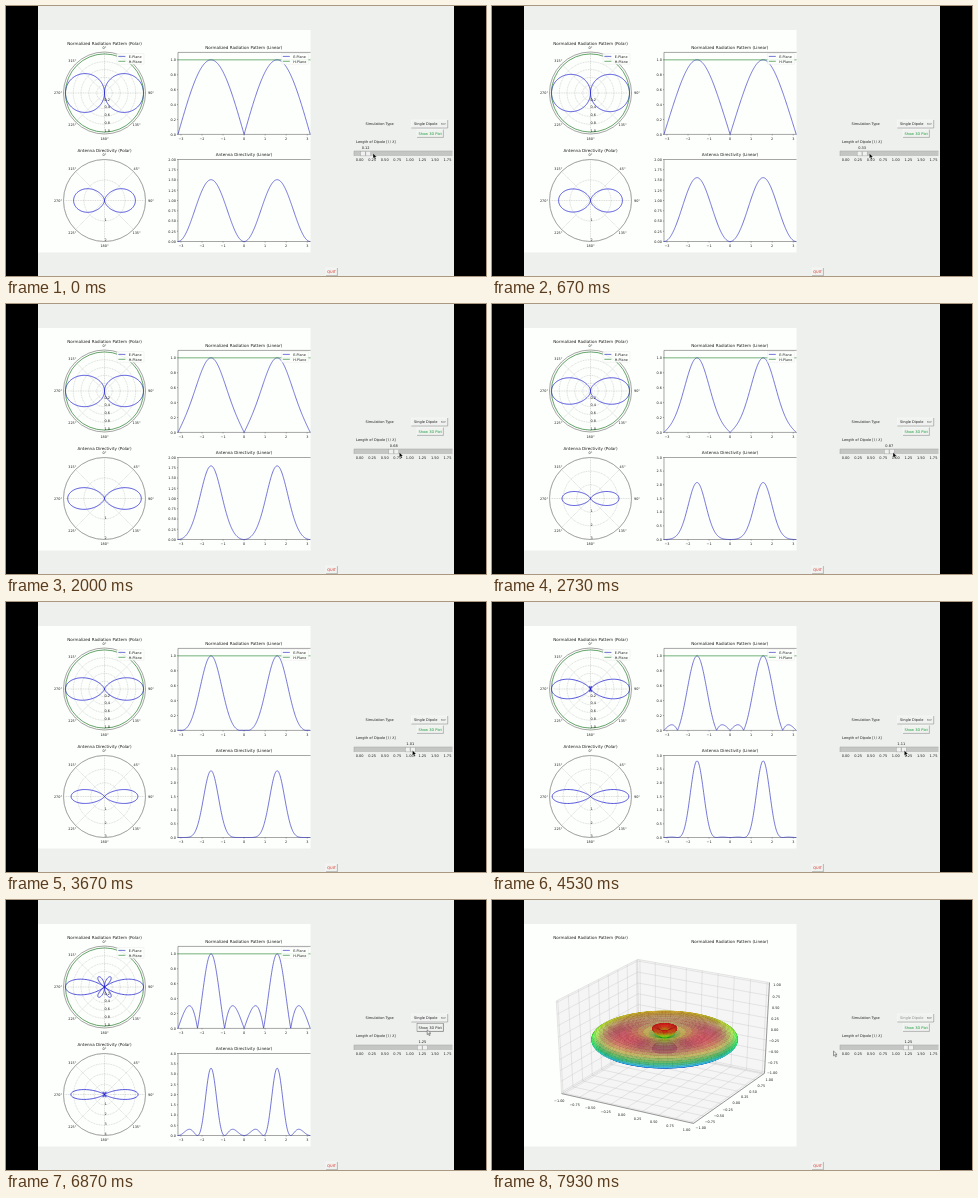
Animation of 480 by 270 pixels, one loop 8000 ms. Source, as an HTML page with a canvas:

```html
<!DOCTYPE html>
<html lang="en">
<head>
<meta charset="utf-8">
<title>Dipole radiation pattern</title>
<style>
  html, body { margin: 0; width: 100%; height: 100%; overflow: hidden; background: #000; }
  svg, canvas { position: absolute; left: 0; top: 0; width: 100vw; height: 100vh; display: block; }
  text { font-family: "DejaVu Sans", sans-serif; font-size: 3.4px; fill: #1c1c1c; text-rendering: geometricPrecision; }
  .title { font-size: 4.1px; }
  .ui { font-size: 3.55px; }
  .mid { text-anchor: middle; }
  .end { text-anchor: end; }
  .frame { fill: none; stroke: #4c4c4c; stroke-width: .5; }
  .grid { fill: none; stroke: #aaa; stroke-width: .4; stroke-dasharray: 1 .7; }
  .e { fill: none; stroke: #1c1cd0; stroke-width: .75; stroke-linejoin: round; }
  .h { fill: none; stroke: #147a1e; stroke-width: .6; }
  .thin { stroke: #2c2cc4; stroke-width: .65; }
  .pane { fill: #f4f5f4; stroke: #c4c4c4; stroke-width: .4; }
  .grid3 { fill: none; stroke: #c0c0c0; stroke-width: .35; }
  .btn { fill: #f0f2f0; stroke: #fafbfa; stroke-width: .5; }
  .edge { fill: none; stroke: #8a8a8a; stroke-width: .6; }
</style>
</head>
<body>
<svg id="stage" viewBox="0 0 480 270" preserveAspectRatio="none">
  <rect x="32" width="416" height="270" fill="#edf0ed"/>
  <rect x="32" y="24" width="272.5" height="222.5" fill="#fdfffc"/>
  <g id="plots"></g>
  <g id="space"></g>
  <g id="titles"></g>
  <g id="panel">
    <text class="ui" x="359.5" y="119.4">Simulation Type</text>
    <rect class="btn" x="405.3" y="114" width="36.4" height="8"/>
    <path class="edge" d="M405.3 122H441.7V114"/>
    <text class="ui" id="menu" x="408" y="119.4">Single Dipole</text>
    <rect x="435.6" y="117.2" width="4" height="1.4" fill="#f6f6f6" stroke="#777" stroke-width=".4"/>
    <rect class="btn" id="show" x="411" y="123.6" width="26.4" height="7.8"/>
    <path class="edge" d="M411 131.4H437.4V123.6"/>
    <text class="ui mid" id="showText" x="424.2" y="128.8">Show 3D Plot</text>
    <text class="ui" x="350" y="137.4">Length of Dipole [l / λ]</text>
    <text class="ui mid" id="value" y="142.8"></text>
    <rect x="348" y="145" width="98.5" height="5" fill="#c4c6c4"/>
    <path d="M348 150V145H446.5" fill="none" stroke="#a2a2a2" stroke-width=".5"/>
    <g id="thumb">
      <rect x="-5" y="145.2" width="10" height="4.7" fill="#eff1ef" stroke="#999" stroke-width=".4"/>
      <path d="M0 145.6V149.6" stroke="#777" stroke-width=".6"/>
    </g>
    <g id="scale"></g>
    <rect class="btn" x="320" y="262" width="11.4" height="7.7"/>
    <path class="edge" d="M320 269.7H331.4V262"/>
    <text class="ui mid" x="325.6" y="267.4" style="fill:#d8281c">QUIT</text>
  </g>
  <path id="cursor" d="M0 0V4.8L1.1 3.8L2 5.8L2.9 5.4L2 3.5H3.6Z"/>
</svg>
<canvas id="surface" width="1920" height="1080"></canvas>
<script>
const $ = id => document.getElementById(id);
const { PI, sin, cos, abs, min, max, ceil, floor } = Math;

const LOOP = 8000, STEP = 1000 / 15, OPEN_3D = 7270;
const CX = 98.5, R = 41, X0 = 238.1, XS = 21.05;
const LEFT = X0 - PI * XS, RIGHT = 304.5;
const top1 = { cy: 87, y0: 128.4, h: 82 };
const top2 = { cy: 194.5, y0: 235.5, h: 82 };

// time, dipole length
const lengthKeys = [[0, .12], [870, .39], [1270, .5], [1730, .61], [2600, .84], [2730, .87],
  [3670, 1.01], [5270, 1.19], [5670, 1.24], [6070, 1.24], [6140, 1.25]];
// time, pointer x, pointer y
const pointerKeys = [[0, 367, 147.4], [870, 380.5, 147.4], [1270, 387, 147.8], [1730, 390.5, 148.4],
  [2730, 401, 148.6], [3670, 406.5, 148.6], [5270, 417.3, 148.6], [5670, 418.4, 148.6],
  [6070, 418.4, 148.6], [6670, 421.2, 129.8], [7800, 421.2, 129.8], [7930, 341.5, 151]];

function track(keys, t, col = 1) {
  const i = keys.findIndex(k => k[0] > t);
  if (i < 0) return keys[keys.length - 1][col];
  const a = keys[i - 1], b = keys[i];
  return a[col] + (b[col] - a[col]) * (t - a[0]) / (b[0] - a[0]);
}

const text = (x, y, s, cls = "mid") => `<text class="${cls}" x="${x}" y="${y}">${s}</text>`;
const path = (d, cls) => `<path class="${cls}" d="${d}"/>`;
const ring = (cy, r, cls) => `<circle class="${cls}" cx="${CX}" cy="${cy}" r="${r}"/>`;
const num = (v, digits) => (v < 0 ? "−" : "") + abs(v).toFixed(digits);
const line = pts => "M" + pts.map(p => p[0].toFixed(2) + " " + p[1].toFixed(2)).join("L");

// Field of a centre-fed dipole of length l wavelengths
function field(l, th) {
  const s = sin(th);
  return abs(s) < 1e-4 ? 0 : abs((cos(PI * l * cos(th)) - cos(PI * l)) / s);
}
function peaks(l) {
  const n = 300;
  let top = 0, sum = 0;
  for (let i = 1; i < n; i++) {
    const th = PI * i / n, f = field(l, th);
    top = max(top, f);
    sum += f * f * sin(th) * PI / n;
  }
  return { top, gain: 2 / sum };
}

const angles = Array.from({ length: 361 }, (_, i) => (i - 180) * PI / 180);
const polar = (f, lim, cy) => line(angles.map(a => [CX + R * f(a) / lim * sin(a), cy - R * f(a) / lim * cos(a)]));
const linear = (f, lim, p) => line(angles.map(a => [X0 + XS * a, p.y0 - p.h * f(a) / lim]));

function axes(p) {
  let s = "";
  for (let k = 0; k < 8; k++) {
    const a = k * PI / 4, dx = sin(a), dy = -cos(a);
    s += path(`M${CX} ${p.cy}L${CX + R * dx} ${p.cy + R * dy}`, "grid");
    const far = k % 4 == 2 ? 46.5 : 45.4;
    s += text(CX + far * dx, p.cy + far * dy + 1.2, k * 45 + "°");
  }
  s += path(`M${RIGHT} ${p.y0}H${LEFT}V${p.y0 - p.h}H${RIGHT}`, "frame");
  for (let v = -3; v <= 3; v++) {
    const x = X0 + XS * v;
    s += path(`M${x} ${p.y0}v1`, "frame") + text(x, p.y0 + 5.1, num(v, 0));
  }
  return s + ring(p.cy, R, "frame");
}
function ticks(p, step, last, lim, digits) {
  let s = "";
  for (let v = 0; v <= last + 1e-6; v += step) {
    const y = p.y0 - p.h * v / lim;
    s += path(`M${LEFT} ${y}h-1`, "frame") + text(169.8, y + 1.25, num(v, digits), "end");
  }
  return s;
}
function rings(cy, step, last, lim) {
  let s = "";
  for (let v = step; v <= last + 1e-6; v += step) s += ring(cy, R * v / lim, "grid");
  return s;
}
function ringLabels(cy, step, last, lim, digits) {
  let s = "";
  for (let v = step; v <= last + 1e-6; v += step)
    s += text(98.4, cy + R * v / lim - .2, num(v, digits), "");
  return s;
}
const legend = x => `<rect x="${x}" y="47.6" width="27" height="10.6" rx=".6" fill="#fdfffc" fill-opacity=".88" stroke="#ddd" stroke-width=".3"/>`
  + path(`M${x + 1.4} 50.4h7`, "e thin") + text(x + 11.8, 51.7, "E-Plane", "")
  + path(`M${x + 1.4} 55.3h7`, "h") + text(x + 11.8, 56.6, "H-Plane", "");

$("titles").innerHTML = text(98.5, 38.6, "Normalized Radiation Pattern (Polar)", "title mid")
  + text(237.8, 42.7, "Normalized Radiation Pattern (Linear)", "title mid");

$("plots").innerHTML = axes(top1) + axes(top2)
  + rings(top1.cy, .2, 1, 1.05) + ticks(top1, .2, 1, 1.1, 1)
  + `<g id="gainAxes"></g>`
  + `<path id="e1" class="e"/><path id="e2" class="e thin"/><path id="d1" class="e"/><path id="d2" class="e thin"/>`
  + ring(top1.cy, R / 1.05, "h") + path(`M${LEFT} ${top1.y0 - top1.h / 1.1}H${RIGHT}`, "h")
  + ringLabels(top1.cy, .2, 1, 1.05, 1) + `<g id="gainLabels"></g>`
  + legend(111) + legend(275.4)
  + text(98.5, 145.6, "Antenna Directivity (Polar)", "title mid")
  + text(238, 149.7, "Antenna Directivity (Linear)", "title mid");

const knob = l => 353.6 + 50.2 * l;
for (let v = 0; v < 2; v += .25) $("scale").innerHTML += text(knob(v), 154.9, v.toFixed(2), "ui mid");

// Perspective view: azimuth -60°, elevation 30°, box from -1 to 1
const DATA = .965;
function project(x, y, z) {
  const depth = 10 - (.2165 * x - .375 * y + .25 * z);
  return [172.6 + 1522 * (.433 * x + .25 * y) / depth,
    138.6 - 1058 * (-.125 * x + .2165 * y + .433 * z) / depth, depth];
}
const poly = (...pts) => line(pts.map(p => project(...p)));

function drawBox() {
  let grid = "", labels = "";
  for (let v = -1; v <= 1; v += .25) {
    const d = v * DATA;
    grid += poly([d, -1, -1], [d, 1, -1], [d, 1, 1]) + poly([1, d, -1], [-1, d, -1], [-1, d, 1])
      + poly([-1, -1, d], [-1, 1, d], [1, 1, d]);
    for (const [p, dx, dy] of [[[d, -1, -1], -4.5, 8], [[1, d, -1], 6, 7], [[1, 1, d], 7.6, 2.2]]) {
      const [x, y] = project(...p);
      labels += text(x + dx, y + dy, num(v, 2));
    }
  }
  $("space").innerHTML = path(poly([-1, -1, -1], [1, -1, -1], [1, 1, -1], [-1, 1, -1]) + "Z", "pane")
    + path(poly([-1, -1, -1], [-1, 1, -1], [-1, 1, 1], [-1, -1, 1]) + "Z", "pane")
    + path(poly([-1, 1, -1], [1, 1, -1], [1, 1, 1], [-1, 1, 1]) + "Z", "pane")
    + path(grid, "grid3")
    + path(poly([-1, -1, -1], [1, -1, -1], [1, 1, -1], [1, 1, 1]), "frame") + labels;
}

function drawSurface() {
  const g = $("surface").getContext("2d"), rows = 80, cols = 100, l = 1.25;
  const { top } = peaks(l), quads = [];
  const point = (i, j) => {
    const th = PI * i / rows, ph = 2 * PI * j / cols, r = DATA * field(l, th) / top;
    return [r * sin(th) * cos(ph), r * sin(th) * sin(ph), r * cos(th)];
  };
  for (let i = 0; i < rows; i++) for (let j = 0; j < cols; j++) {
    const c = [point(i, j), point(i + 1, j), point(i + 1, j + 1), point(i, j + 1)];
    const z = (c[0][2] + c[1][2]) / 2, p = c.map(q => project(...q));
    quads.push({ p, z, depth: p.reduce((s, q) => s + q[2], 0) });
  }
  quads.sort((a, b) => b.depth - a.depth);
  g.scale(4, 4);
  g.lineWidth = .2;
  for (const { p, z } of quads) {
    const hue = 285 * (.5 - max(-.5, min(.5, z / .44)));
    g.beginPath();
    p.forEach(q => g.lineTo(q[0], q[1]));
    g.closePath();
    g.fillStyle = `hsla(${hue},88%,50%,.58)`;
    g.fill();
    g.strokeStyle = `hsla(${hue},70%,32%,.3)`;
    g.stroke();
  }
}

let shownLim = 0, shownLength = 0;
function drawPlots(l) {
  if (l === shownLength) return;
  shownLength = l;
  const { top, gain } = peaks(l);
  const e = a => field(l, a) / top, d = a => gain * field(l, a) ** 2;
  const lim = ceil(gain * top * top);
  if (lim !== shownLim) {
    shownLim = lim;
    $("gainAxes").innerHTML = rings(top2.cy, 1, lim, lim)
      + (lim < 3 ? ticks(top2, .25, lim, lim, 2) : ticks(top2, .5, lim, lim, 1));
    $("gainLabels").innerHTML = ringLabels(top2.cy, 1, lim, lim, 0);
  }
  $("e1").setAttribute("d", polar(e, 1.05, top1.cy));
  $("e2").setAttribute("d", linear(e, 1.1, top1));
  $("d1").setAttribute("d", polar(d, lim, top2.cy));
  $("d2").setAttribute("d", linear(d, lim, top2));
  $("value").textContent = l.toFixed(2);
  $("value").setAttribute("x", knob(l));
  $("thumb").setAttribute("transform", `translate(${knob(l)})`);
}

function render(now) {
  const k = floor((now % LOOP + 4) / STEP), t = k * STEP + 4;
  const open = t >= OPEN_3D, x = track(pointerKeys, t), y = track(pointerKeys, t, 2);
  const hover = !open && y < 131.4, released = open || y < 145;
  drawPlots(Math.round(track(lengthKeys, t) * 100) / 100);
  $("plots").style.display = open ? "none" : "";
  $("space").style.display = $("surface").style.display = open ? "" : "none";
  $("menu").style.fill = open ? "#8a8a8a" : "";
  $("showText").style.fill = hover ? "#222" : "#159a35";
  $("show").style.stroke = hover ? "#777" : "";
  const cursor = $("cursor");
  cursor.setAttribute("transform", `translate(${x} ${y})`);
  cursor.style.fill = released ? "#f4f5f4" : "#000";
  cursor.style.stroke = released ? "#555" : "#fff";
  cursor.style.strokeWidth = released ? .6 : .25;
}

drawBox();
drawSurface();
const start = performance.now();
function loop() {
  render(performance.now() - start);
  requestAnimationFrame(loop);
}
loop();
</script>
</body>
</html>
```
